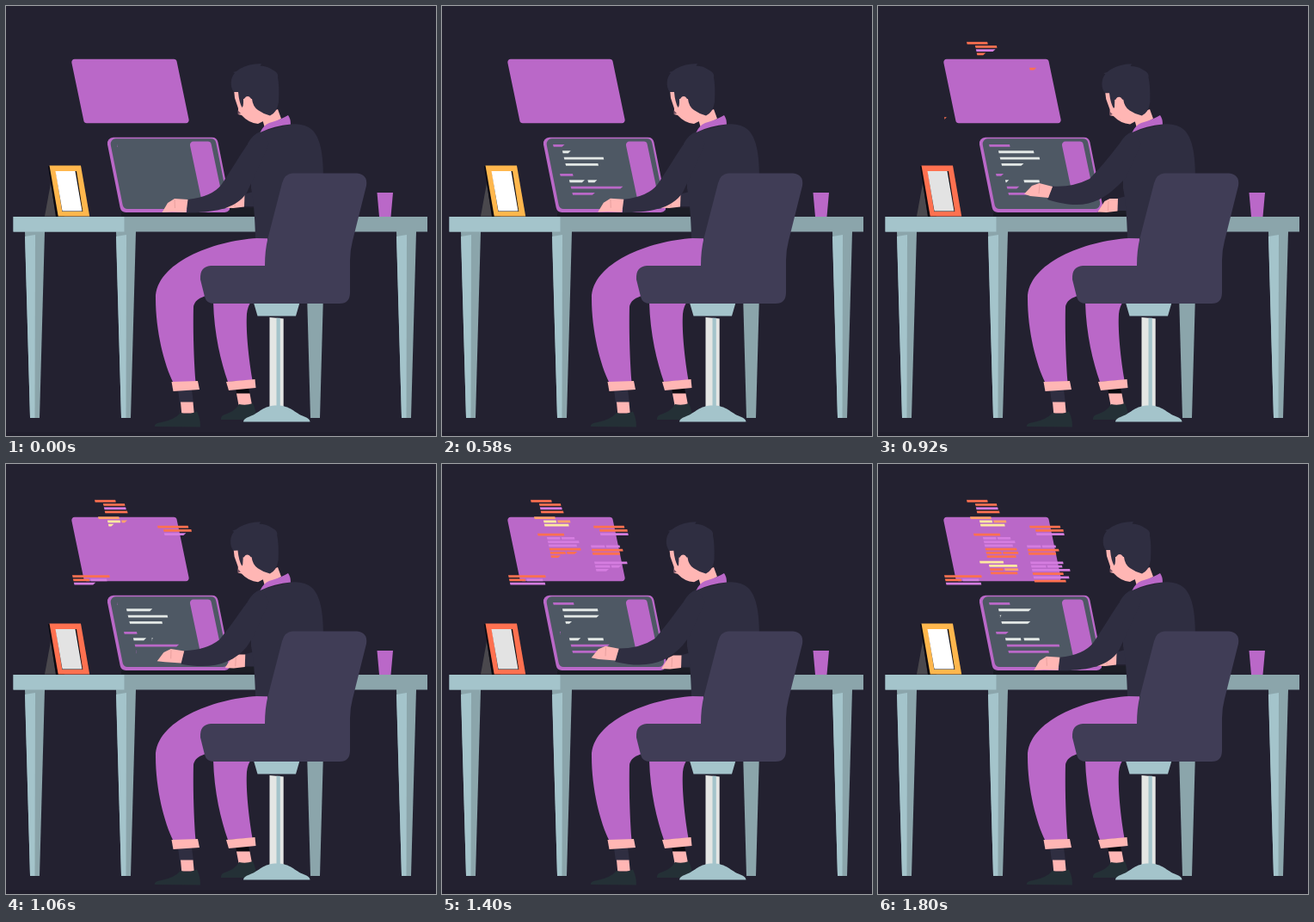
An HTML page with a canvas that plays this animation: 500 by 500 pixels, repeating every 1.82 s.

```html
<!DOCTYPE html>
<html lang="en">
<head>
<meta charset="utf-8">
<title>Coder at a desk</title>
<style>
html, body { margin: 0; width: 100%; height: 100%; overflow: hidden; background: #232130; }
canvas { display: block; width: 100vw; height: 100vh; }
</style>
</head>
<body>
<canvas id="stage" width="500" height="500"></canvas>
<script>
const ctx = document.getElementById('stage').getContext('2d');
const LOOP = 1820;
const C = {
  bg: '#232130', floor: '#201e2c', purple: '#ba68c8', violet: '#d57de0', orange: '#ff7150',
  amber: '#ffb74d', pale: '#ffe9a0', peach: '#ffa36b', paper: '#e3e8e6', teal: '#a4c4cb',
  tealDark: '#8ba5ab', skin: '#ffb6b4', crease: '#d9908f', body: '#2f2e41', chair: '#403d56',
  shoe: '#243036', screen: '#4e5864', black: '#0b0a10'
};
const INK = { o: C.orange, v: C.violet, p: C.pale, a: C.peach };

const clamp = v => Math.max(0, Math.min(1, v));
const easeOut = p => 1 - (1 - p) * (1 - p);
const mix = (a, b, d) => a.map((v, i) => v + (b[i] - v) * d);

function seeded(seed) {
  return () => (seed = (seed * 16807) % 2147483647) / 2147483647;
}

function poly(color, pts) {
  ctx.fillStyle = color;
  ctx.beginPath();
  for (let i = 0; i < pts.length; i += 2) ctx.lineTo(pts[i], pts[i + 1]);
  ctx.fill();
}

// Four-sided panel whose sides lean to the right
function panel(color, x, y, w, h, lean, r) {
  const pts = [x, y, x + w, y, x + w + lean, y + h, x + lean, y + h];
  ctx.fillStyle = color;
  ctx.beginPath();
  ctx.moveTo(x + lean / 2, y + h / 2);
  for (let i = 0; i < 8; i += 2) {
    ctx.arcTo(pts[i], pts[i + 1], pts[(i + 2) % 8], pts[(i + 3) % 8], r);
  }
  ctx.fill();
}

function shape(color, d) {
  ctx.fillStyle = color;
  ctx.fill(new Path2D(d));
}

function crease(x1, y1, x2, y2) {
  ctx.strokeStyle = C.crease;
  ctx.lineWidth = 0.6;
  ctx.beginPath();
  ctx.moveTo(x1, y1);
  ctx.lineTo(x2, y2);
  ctx.stroke();
}

function bar(color, x, y, full, w) {
  if (w <= 0) return;
  const len = full * w;
  const tip = w < 1 ? -Math.min(3, len) : 0.6;
  poly(color, [x, y, x + len, y, x + len + tip, y + 2.8, x + 0.7, y + 2.8]);
}

// Each line is typed, held, wiped and typed again
function typed(t, start) {
  if (t < start) return 0;
  const u = (t - start) % 530;
  return u < 405 ? easeOut(clamp(u / 150)) : 1 - clamp((u - 405) / 100);
}

// Two paragraphs, each a short heading and three indented lines
function screenText(t) {
  const lengths = [24, 41, 46, 38, 15, 18, 61, 47];
  const starts = [0, 100, 240, 325, 335, 440, 440, 530];
  lengths.forEach((len, i) => {
    const heading = i % 4 === 0;
    const y = 161 + i * 7.35 + (i > 3 ? 4.6 : 0);
    const x = 129 + (y - 161) * 0.235 + (heading ? 0 : 9.2);
    const color = heading || i > 5 ? C.purple : C.paper;
    bar(color, x, y, len, typed(t, starts[i]));
    if (i === 5) bar(color, x + 21.5, y, len, typed(t, 525));
  });
}

// Each letter is a word in that ink, each group a line
const sections = [
  { x: 103, y: 41.7, width: 28, start: 750, indent: 9, code: 'o o v o' },
  { x: 107, y: 61.2, width: 28, start: 950, indent: 10, code: 'a pa p' },
  { x: 111, y: 80.8, width: 33, start: 1100, indent: 10, code: 'o vv v v o oo o' },
  { x: 118, y: 112.8, width: 31, start: 1450, indent: 10, code: 'p p oa o' },
  { x: 176, y: 71.7, width: 36, start: 900, indent: 6, code: 'o o v' },
  { x: 77, y: 129.3, width: 40, start: 915, indent: 0, code: 'o ov v' },
  { x: 173, y: 94.4, width: 36, start: 1130, indent: 0, code: 'vv o o' },
  { x: 177, y: 113.5, width: 40, start: 1280, indent: 0, code: 'v vv v o v o' }
];

function floatingText(t) {
  const rand = seeded(77);
  for (const { x, y, width, start, indent, code } of sections) {
    code.split(' ').forEach((words, row) => {
      const part = width * (0.88 + 0.24 * rand()) / words.length;
      const left = x + row * 0.9 + (row ? indent : 0);
      const shown = clamp((t - start - row * 45) / 90) * words.length;
      [...words].forEach((ink, k) => {
        bar(INK[ink], left + k * (part + 1), y + row * 4.23, part - 0.5, clamp(shown - k));
      });
    });
  }
}

function deskLeg(x, shaded) {
  poly(C.tealDark, [x, 262, x + 23, 262, x + 17, 479, x + 6, 479]);
  if (!shaded) poly(C.teal, [x, 268, x + 12, 266, x + 11.5, 479, x + 6, 479]);
}

function desk() {
  for (const x of [22, 128, 454]) deskLeg(x);
  deskLeg(348, true);
  ctx.fillStyle = C.tealDark;
  ctx.fillRect(8.5, 245, 481.5, 17.5);
  ctx.fillStyle = C.teal;
  ctx.fillRect(8.5, 245, 129, 17.5);
  poly(C.purple, [431.5, 217, 450, 217, 447.5, 245, 434, 245]);
}

function photoFrame(t) {
  const warm = t >= 920 && t < 1600;
  poly('#4a484d', [52, 206, 45, 244.5, 58, 244.5]);
  panel(C.black, 49, 186, 10, 59, 9, 0);
  panel(warm ? C.orange : C.amber, 50.5, 185.5, 36.5, 59, 10.2, 0);
  panel(C.black, 58, 192, 24, 47, 7.3, 0);
  panel(warm ? '#e3e3e3' : '#ffffff', 57.5, 192, 23, 46.5, 8, 0);
}

function laptop(t) {
  panel(C.purple, 116.3, 152.7, 129, 87.2, 17.5, 7);
  panel(C.screen, 120.3, 154.3, 123, 81.7, 16.3, 6);
  panel(C.purple, 213, 157.5, 25, 66.5, 14, 4);
  panel('#191a23', 134, 240.5, 156, 4, 0, 0);
  panel('#1c1d26', 260, 234.5, 30, 7.5, 0, 0);
  screenText(t);
}

function farHand(d) {
  ctx.save();
  ctx.translate(d * 1.5, d * 5);
  poly(C.body, [276, 219, 291, 215, 291, 233, 276, 233]);
  poly(C.skin, [254, 234.5, 262, 222, 268, 219, 277.5, 219, 277, 233.5, 264, 235]);
  crease(266.5, 222, 266, 233);
  ctx.restore();
}

function torso() {
  shape(C.body, 'M296 146 Q287 149 281 160 L285 190 L285 212 Q289 230 290 270 L340 271 ' +
    'L369 200 C369 170 365 153 356 144 Q347 136 331 137.5 Z');
}

// Arm and hand swing between resting low and reaching up
function nearArm(d) {
  const [ux, uy, vx, vy, cx, cy] = mix([251, 207, 240, 222, 211, 225], [246, 201, 226, 211, 203, 209.5], d);
  const [wx, wy, px, py, qx, qy, ey] =
    mix([210, 240.5, 240, 240, 267, 237, 217], [197, 225, 238, 238, 258, 229, 208], d);
  shape(C.body, `M297 146 C283 152 274 173 ${ux} ${uy} Q${vx} ${vy} ${cx} ${cy} L${wx} ${wy} ` +
    `C${px} ${py} ${qx} ${qy} 280 ${ey} L288 200 L306 160 Z`);
  poly(C.skin, mix([181.5, 240, 188, 229, 196, 224, 211.5, 225, 209.5, 240, 193, 239.5],
    [170, 218.5, 179, 209, 187.5, 206, 203, 210, 198, 223, 177, 221], d));
  crease(...mix([196, 225, 196.5, 235], [188, 207.5, 187, 218], d));
}

function head(d) {
  poly(C.skin, [297, 128, 316, 120, 320, 131, 301, 142]);
  ctx.save();
  ctx.translate(308, 134);
  ctx.rotate(-0.03 * d);
  ctx.translate(-308, -134);
  shape(C.skin, 'M265 97 L266 107 L270 119 L270 126 L274 127 Q282 136 293 137 L305 131 L306 100 Z');
  shape(C.body, 'M265 100 C260 94 261 83 266 78 L264 77 Q269 76 272 73 Q282 67 297 67 L295.5 69.5 ' +
    'Q304 70 308 73 L313 76 Q317 79 316 83 Q318 92 317 112 Q315 124 307 127.5 Q300 126 293 121 ' +
    'Q287 117 286 108 L276 108 L276 116 L274.5 118 Q271 112 270 100 Z');
  ctx.fillStyle = C.skin;
  ctx.beginPath();
  ctx.ellipse(281, 112.5, 5, 7.5, 0, 0, Math.PI * 2);
  ctx.fill();
  poly(C.skin, [276, 113, 286, 113, 288, 124, 275, 122]);
  poly('#74505f', [269.5, 121, 273, 125, 269.5, 126]);
  ctx.restore();
  shape(C.purple, 'M295.5 147 Q299 139 306 136 Q320 132 328 127 Q331 131 331 137.5 Q312 139 295.5 147 Z');
}

function legs() {
  shape(C.purple, 'M241 344 C242 382 250 414 258 437 L286.5 435 C281 402 279 374 280 358 Q281 349 285 344 Z');
  shape(C.purple, 'M304 269.5 L292 270 C240 273 174 299 174 340 C174 378 184 417 194.5 438 L220.5 437 ' +
    'C218 405 217.5 370 218 350 Q219 340 236 336 L304 304 Z');
  panel(C.body, 200, 446, 16, 16, 2, 0);
  panel(C.skin, 203, 460.5, 14.5, 13, 1.2, 0);
  panel(C.black, 267, 444.5, 15, 7, 1.5, 0);
  panel(C.skin, 268, 450.5, 15.5, 13.5, 2.5, 0);
  poly(C.skin, [192.5, 437, 223, 436, 225, 446, 194.5, 448]);
  poly(C.skin, [256, 437, 289.5, 434, 290.5, 444, 259, 447]);
  shape(C.shoe, 'M173 489 Q172 485 181 484 Q196 481 203 473 Q212 476 222 471.5 Q226 479 226 489.5 Z');
  shape(C.shoe, 'M250 481 Q249 476 257 474 Q266 471 271 463 Q279 465 287 462 Q291 470 291 481 Z');
}

function chair() {
  poly('#e4e6e4', [306.5, 362, 322.7, 363.5, 322.7, 468, 306.5, 468]);
  panel(C.teal, 314.5, 362.7, 4.3, 105, 0, 0);
  poly(C.teal, [288, 345, 341.5, 345, 337, 360.5, 292.5, 360.5]);
  shape(C.teal, 'M276 483.5 Q276 480 283 477.5 C295 473 299 464.5 315 464.5 ' +
    'C331 464.5 335 473 347 477.5 Q353.5 480 353.5 483.5 Z');
  shape(C.chair, 'M333 194.5 L408 194.5 Q421 196 419 209 L403 273 Q400 284 400 296 L400 333 ' +
    'Q400 346 388 346 L242 346 Q233 346 231 338 L226 318 Q225 303 238 302 L301 302 ' +
    'Q301 284 304.5 270 L321 206 Q324 195 333 194.5 Z');
}

function draw(t) {
  const reach = (1 - Math.cos(t / LOOP * 3 * Math.PI * 2)) / 2;
  ctx.fillStyle = C.bg;
  ctx.fillRect(0, 0, 500, 500);
  ctx.fillStyle = C.floor;
  ctx.fillRect(0, 495.5, 500, 4.5);
  panel(C.purple, 75.5, 61.8, 122.5, 74.4, 15.5, 3.5);
  floatingText(t);
  desk();
  photoFrame(t);
  laptop(t);
  farHand(reach);
  legs();
  torso();
  nearArm(reach);
  head(reach);
  chair();
}

const began = performance.now();
function tick() {
  draw((performance.now() - began) % LOOP);
  requestAnimationFrame(tick);
}
tick();
</script>
</body>
</html>
```
